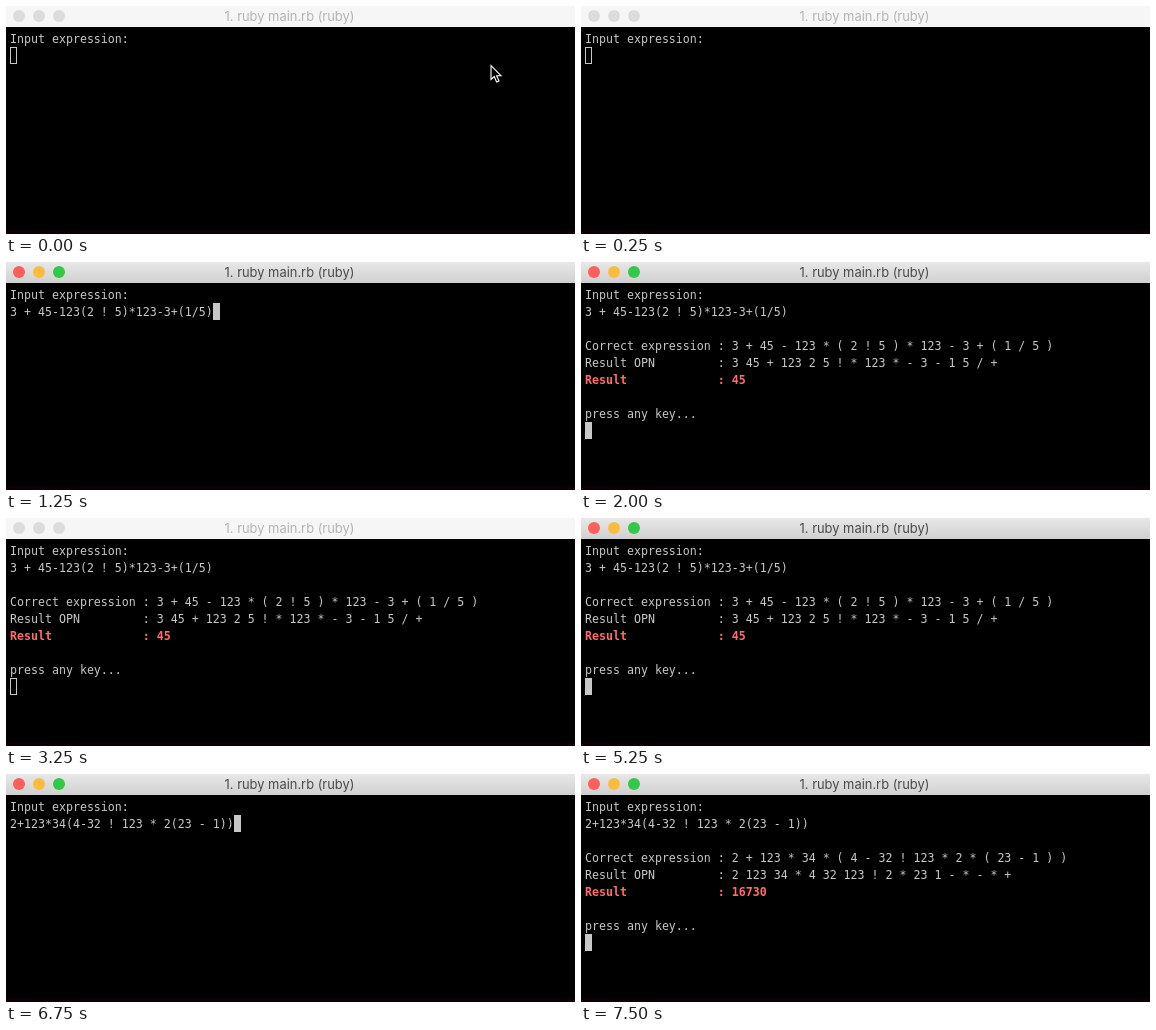
An HTML page that plays this animation: 569 px wide and 228 px high, repeating every 8 s.

```html
<!DOCTYPE html>
<html lang="en">
<head>
<meta charset="utf-8">
<style>
  html, body { margin: 0; width: 100%; height: 100%; overflow: hidden; background: #000; }
  svg { display: block; }
  text { white-space: pre; }
  #title { font: 12.9px Inter, sans-serif; text-anchor: middle; }
  #lines { font: 11.627px "DejaVu Sans Mono", monospace; fill: #c7c7c7; }
  #lines .result { fill: #ff6e67; font-weight: 700; }
</style>
</head>
<body>
<svg width="569" height="228" viewBox="0 0 569 228">
  <defs>
    <linearGradient id="active" x2="0" y2="1">
      <stop stop-color="#e9e8e9"/>
      <stop offset="1" stop-color="#d1d0d1"/>
    </linearGradient>
  </defs>
  <rect width="569" height="228"/>
  <rect y="224" width="569" height="4" fill="#0c0006"/>
  <rect id="bar" width="569" height="21"/>
  <g id="lights">
    <circle cx="13" cy="10" r="6"/>
    <circle cx="33" cy="10" r="6"/>
    <circle cx="53" cy="10" r="6"/>
  </g>
  <text id="title" x="283.5" y="15">1. ruby main.rb (ruby)</text>
  <g id="lines"></g>
  <rect id="cursor"/>
  <path id="pointer" d="M485 59.5V73.5L488.2 70.5L490.6 76L493 75L490.6 69.7H495Z" fill="#000" stroke="#fff" stroke-width="1.1"/>
</svg>
<script>
const LOOP = 8000, CHAR = 7, LINE = 17, LEFT = 4, TOP = 24;
const $ = id => document.getElementById(id);

const prompt = "Input expression:";
const report = (input, correct, opn, result) => [
  prompt, input, "",
  "Correct expression : " + correct,
  "Result OPN         : " + opn,
  "Result             : " + result,
  "", "press any key...", ""
];

const first = "3 + 45-123(2 ! 5)*123-3+(1/5)";
const second = "2+123*34(4-32 ! 123 * 2(23 - 1))";
const screens = [
  [0, [prompt, ""]],
  [1250, [prompt, first]],
  [2000, report(first, "3 + 45 - 123 * ( 2 ! 5 ) * 123 - 3 + ( 1 / 5 )",
    "3 45 + 123 2 5 ! * 123 * - 3 - 1 5 / +", "45")],
  [6250, [prompt, ""]],
  [6750, [prompt, second]],
  [7250, report(second, "2 + 123 * 34 * ( 4 - 32 ! 123 * 2 * ( 23 - 1 ) )",
    "2 123 34 * 4 32 123 ! 2 * 23 1 - * - * +", "16730")]
];
const focus = [[0, false], [1000, true], [3250, false], [5250, true]];

const at = (track, t) => track.filter(([start]) => start <= t).pop()[1];

function setAttrs(node, attrs) {
  for (const [name, value] of Object.entries(attrs)) node.setAttribute(name, value);
}

function drawLines(lines) {
  $("lines").replaceChildren(...lines.map((line, row) => {
    const node = document.createElementNS("http://www.w3.org/2000/svg", "text");
    setAttrs(node, { x: LEFT, y: TOP + row * LINE + 13 });
    if (line.startsWith("Result  ")) node.setAttribute("class", "result");
    node.textContent = line;
    return node;
  }));
}

function drawCursor(lines, focused) {
  const row = lines.length - 1;
  const inset = focused ? 0 : 0.5;
  setAttrs($("cursor"), {
    x: LEFT + lines[row].length * CHAR + inset,
    y: TOP + row * LINE + inset,
    width: CHAR - 2 * inset,
    height: LINE - 2 * inset,
    fill: focused ? "#c7c7c7" : "none",
    stroke: focused ? "none" : "#c7c7c7"
  });
}

function drawWindow(focused) {
  $("bar").setAttribute("fill", focused ? "url(#active)" : "#f6f6f6");
  $("title").setAttribute("fill", focused ? "#4a4a4a" : "#b4b4b4");
  const colors = focused ? ["#fc605b", "#fdbc40", "#34c84a"] : Array(3).fill("#dcdcdc");
  [...$("lights").children].forEach((light, i) => light.setAttribute("fill", colors[i]));
}

let shownLines, shownFocus;
function render(t) {
  const lines = at(screens, t), focused = at(focus, t);
  $("pointer").setAttribute("visibility", t < 250 ? "visible" : "hidden");
  if (lines === shownLines && focused === shownFocus) return;
  drawLines(lines);
  drawCursor(lines, focused);
  drawWindow(focused);
  shownLines = lines;
  shownFocus = focused;
}

const begin = performance.now();
function tick() {
  render((performance.now() - begin) % LOOP);
  requestAnimationFrame(tick);
}
tick();
</script>
</body>
</html>
```
